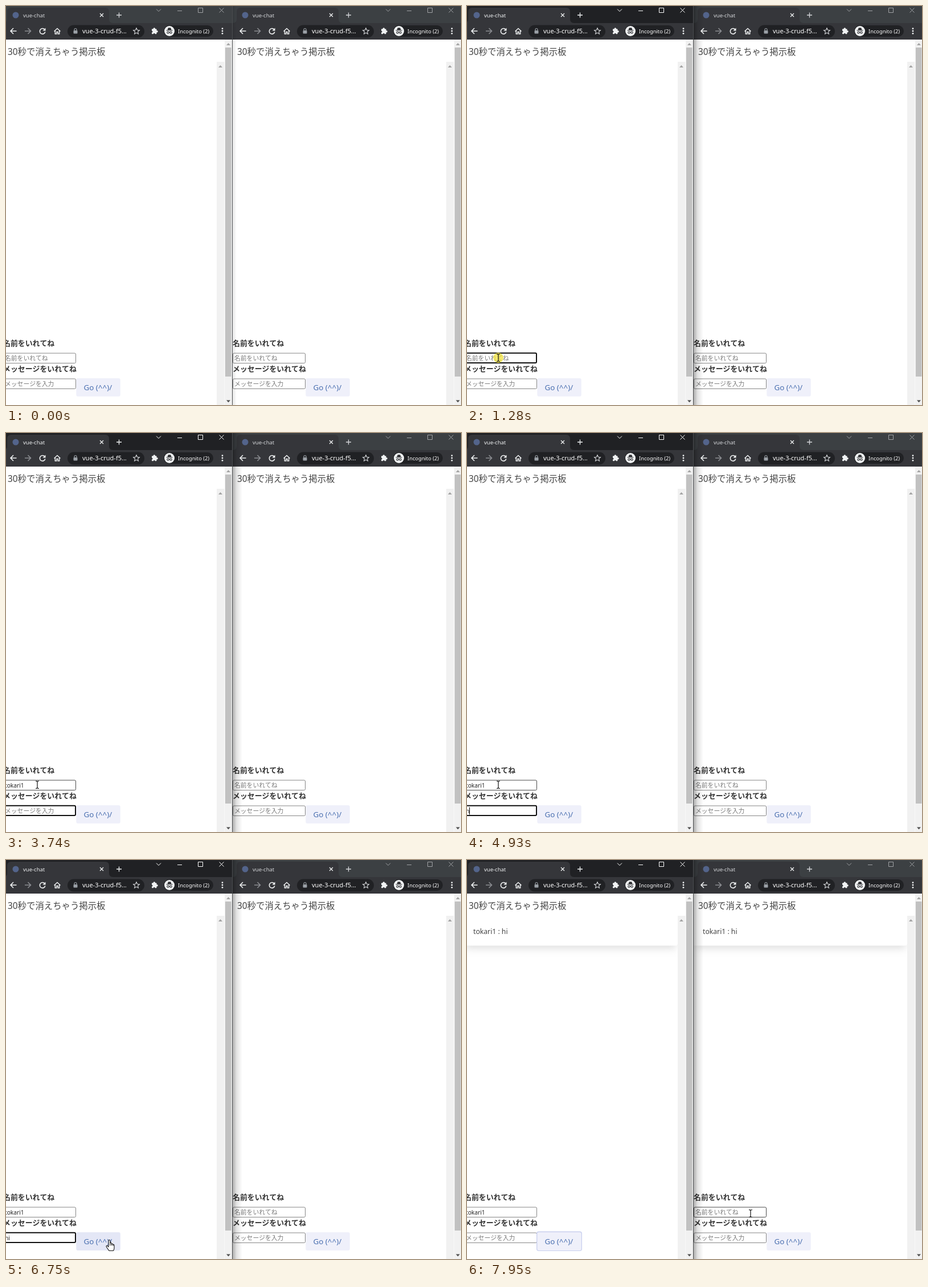
Recreate the animation shown at these times as an HTML page with a canvas. Size 799x701 px, loop 8000 ms.

```html
<!DOCTYPE html>
<html lang="ja">
<head>
<meta charset="utf-8">
<title>vue-chat</title>
<style>
  html, body { margin: 0; width: 799px; height: 701px; overflow: hidden; background: #fff; }
  canvas { display: block; }
</style>
</head>
<body>
<canvas id="stage" width="799" height="701"></canvas>
<script>
const c = document.getElementById('stage').getContext('2d');
const FONT = '"Noto Sans", "Noto Sans CJK JP", "Noto Sans CJK", sans-serif';
const LOOP = 8000, RIGHT = 403, BLINK = 530;
const NAME = 'tokari', MESSAGE = 'hi';

// Pointer stops: time, x, y. The pointer rests at each until the next.
const STOPS = [
  [200, 411, 675], [270, 302, 646], [470, 205, 610], [540, 108, 585], [610, 61, 578],
  [810, 55, 618], [6050, 92, 620], [6120, 210, 625], [6190, 288, 632], [6260, 284, 645],
  [6330, 254, 665], [6400, 219, 674], [6470, 206, 674], [6540, 196, 672], [6610, 188, 670],
  [6680, 183, 669], [6750, 181, 668], [7210, 345, 662], [7280, 510, 646],
  [7540, 507, 640], [7610, 503, 630], [7680, 500, 620], [7750, 498, 613],
  [7820, 498, 616], [7880, 498, 619], [7950, 498, 621]
];
const NAME_KEYS = [1560, 1690, 1820, 1950, 2080, 2210, 3340];
const MESSAGE_KEYS = [4930, 5060];
const ACTIVATE = 950, TAB = 3740, SEND = 6950, RECEIVE = 7080;

const BEAM = new Path2D('M-3-6.5Q0-6.5 0-5Q0-6.5 3-6.5M0-5V5M-3 6.5Q0 6.5 0 5Q0 6.5 3 6.5');
const ARROW = new Path2D('M.5.5V13L3.4 10.3L5.3 14.9L7.5 14L5.6 9.5H9.4Z');
const HAND = new Path2D('M-1 1.2Q-1-.5.4-.5Q1.9-.5 1.9 1.2V6.5Q2-.2 4.4 6.7Q6.9 5.6 7 7.8Q9 7 9 9V14Q9 16 7.5 18.5H0L-4.5 12Q-5.8 9.5-3.4 9.5L-1 11.5Z');

function box(x, y, w, h, r, fill, stroke, width = 1) {
  c.beginPath();
  c.roundRect(x, y, w, h, r);
  if (fill) { c.fillStyle = fill; c.fill(); }
  if (stroke) { c.strokeStyle = stroke; c.lineWidth = width; c.stroke(); }
}
const disc = (x, y, r, fill) => box(x - r, y - r, 2 * r, 2 * r, r, fill);
function line(d, color, width = 1) {
  c.strokeStyle = color;
  c.lineWidth = width;
  c.stroke(typeof d === 'string' ? new Path2D(d) : d);
}
function shape(d, color) {
  c.fillStyle = color;
  c.fill(typeof d === 'string' ? new Path2D(d) : d);
}
function text(s, x, y, size, color, weight = 400) {
  c.font = `${weight} ${size}px ${FONT}`;
  c.fillStyle = color;
  c.fillText(s, x, y);
}
const typed = (s, keys, t) => s.slice(0, keys.filter(k => k <= t).length);
const inside = (p, x, y, w, h) => p && p.x >= x && p.x < x + w && p.y >= y && p.y < y + h;

function pointerAt(t) {
  const stop = STOPS.filter(s => s[0] <= t).pop();
  return stop && { x: stop[1], y: stop[2] };
}

function browserBar(active) {
  const dark = '#202124', bar = '#35363a', white = '#f1f3f4', grey = '#8b8d91';
  const control = active ? '#fff' : '#a0a2a5';
  box(-6, 0, 404, 31, 0, active ? dark : '#3c4043');
  shape('M-5 30Q2 30 2 23V10Q2 3 9 3H174Q181 3 181 10V23Q181 30 188 30Z', bar);
  box(-6, 30, 404, 29, 0, bar);
  disc(17, 16, 5.5, '#53648b');
  text('vue-chat', 30, 19.5, 9.5, active ? '#f1f3f4' : '#d5d7da');
  line('M165 13L171 19M171 13L165 19', white, 1.3);
  line('M194 16H203M198.5 11.5V20.5', active ? white : '#d5d7da', 1.3);
  line('M264 5.5L268 9.5L272 5.5M301 8.5H309M374.5 3.5L382.5 11.5M382.5 3.5L374.5 11.5', control);
  box(337.5, 3.5, 8, 8, 0, null, control);

  line('M18.5 44H8M13 39L8 44L13 49', white, 1.6);
  line('M33 44H43.5M38.5 39L43.5 44L38.5 49', grey, 1.6);
  line('M68 41.5A4.8 4.8 0 1 0 68.8 45.5', white, 1.6);
  shape('M69.5 38.5V43.5H64.5Z', white);
  line('M84.5 44.5L90 39.5L95.5 44.5M86.3 43.5V49H88.8V45.5H91.2V49H93.7V43.5', white, 1.4);

  box(108, 33.5, 135, 22, 11, dark);
  box(118.5, 43, 7, 5.5, 1, '#9aa0a6');
  line('M120 43V41.5A2 2 0 0 1 124 41.5V43', '#9aa0a6', 1.2);
  text('vue-3-crud-f5...', 134, 48, 11, '#fff', 500);
  line('M229 38.7l1.6 3.6 3.8.4-2.9 2.6.9 3.8-3.4-2-3.4 2 .9-3.8-2.9-2.6 3.8-.4z', '#d5d7da', 1.1);

  box(256, 40.3, 8.5, 9, 1, white);
  disc(260.3, 40, 1.8, white);
  disc(265, 44.8, 1.8, white);
  disc(256, 45, 1.5, bar);
  disc(260.3, 49.3, 1.5, bar);

  box(277, 34, 87, 20, 10, dark);
  disc(287, 44, 9, white);
  shape('M283.6 42l1.1-3.8h4.6l1.1 3.8z', '#303134');
  line('M281.5 42.8H292.5M286.2 46.3H287.8', '#303134', 1.1);
  for (const x of [284.5, 289.5]) box(x - 1.7, 44.8, 3.4, 3.4, 1.7, null, '#303134', 1.1);
  text('Incognito (2)', 302, 47.5, 9.3, '#fff');
  for (const y of [39.7, 44, 48.3]) disc(380, y, 1.4, white);
}

function card(message) {
  c.save();
  c.beginPath();
  c.rect(-6, 99, 376, 90);
  c.clip();
  c.shadowColor = 'rgba(0,0,0,.13)';
  c.shadowBlur = 14;
  c.shadowOffsetY = 8;
  box(-2, 102, 369, 45, 4, '#fff');
  c.restore();
  box(-6, 99, 376, 51.5, [0, 0, 4, 0], '#fff');
  text(message, 11, 129.5, 12.2, '#444');
}

function field(y, value, hint, focused, hovered, caret) {
  if (focused) box(-4, y + .2, 126, 17.3, 2, '#fff', '#101010', 2);
  else box(-4.5, y + .5, 127, 17.5, 2, '#fff', hovered ? '#4a4a4a' : '#858585');
  if (value) text(value, -2, y + 13, 10.2, '#222');
  else text(hint, -2, y + 13.5, 10.8, '#7a7a7a');
  if (focused && caret) {
    c.font = `10.2px ${FONT}`;
    box(Math.round(-2 + c.measureText(value).width), y + 3, 1, 13, 0, '#000');
  }
}

function scrollbars() {
  box(370, 98, 13.5, 603, 0, '#f1f1f1');
  shape('M373 108L376.5 104L380 108Z', '#a3a3a3');
  box(384, 59, 14, 642, 0, '#f1f1f1');
  box(385, 73, 10.5, 578, 0, '#c1c1c1');
  shape('M387 69L390.5 65L394 69Z', '#a3a3a3');
  shape('M387 692.5L390.5 696.5L394 692.5Z', '#505050');
}

function chatWindow(offset, clipX, clipW, s) {
  c.save();
  c.beginPath();
  c.rect(clipX, 0, clipW, 701);
  c.clip();
  c.translate(offset, 0);
  const p = s.pointer && { x: s.pointer.x - offset, y: s.pointer.y };
  box(-6, 59, 404, 642, 0, '#fff');
  browserBar(s.active);
  text('30秒で消えちゃう掲示板', 3, 85.5, 15.4, '#444', 300);
  if (s.message) card(s.message);
  scrollbars();
  text('名前をいれてね', -5, 597.3, 12.9, '#333', 700);
  field(609.5, s.name, '名前をいれてね', s.focus === 'name', inside(p, -5, 609, 128, 19), s.caret);
  text('メッセージをいれてね', -5, 642.3, 12.9, '#333', 700);
  field(654.5, s.draft, 'メッセージを入力', s.focus === 'draft', inside(p, -5, 654, 128, 19), s.caret);
  const hover = inside(p, 123, 654, 78, 32);
  if (s.focus === 'go') box(122, 652.5, 80, 34.5, 4, '#c8cfee');
  box(123.3, 654, 77.5, 32, 3, hover ? '#e4e7f6' : '#eff0fa');
  text('Go (^^)/', 136.5, 675, 13.4, '#4a6fb0');
  c.restore();
}

function drawPointer({ x, y }) {
  const over = (...r) => inside({ x, y }, ...r) || inside({ x: x - RIGHT, y }, ...r);
  c.save();
  c.translate(x, y);
  if (over(-5, 609, 128, 19) || over(-5, 654, 128, 19)) {
    line(BEAM, '#111', 1.2);
  } else {
    const icon = over(123, 654, 78, 32) ? HAND : ARROW;
    shape(icon, '#fff');
    line(icon, '#111', 1.1);
    if (icon === HAND) line('M1.9 6.5V9.5M4.4 6.7V9.5M7 7.8V10', '#111', 1);
  }
  c.restore();
}

function edgeShadow(level) {
  const g = c.createLinearGradient(398, 0, 415, 0);
  const alpha = .1 + .22 * level;
  g.addColorStop(0, `rgba(0,0,0,${alpha})`);
  g.addColorStop(.4, `rgba(0,0,0,${alpha * .36 * level})`);
  g.addColorStop(1, 'rgba(0,0,0,0)');
  box(398, 0, 17, 701, 0, g);
  box(397, 0, 1, 701, 0, '#4b4d50');
}

function draw(t) {
  const pointer = pointerAt(t);
  const lastKey = [ACTIVATE, TAB, ...NAME_KEYS, ...MESSAGE_KEYS]
    .filter(k => k <= t).reduce((a, b) => Math.max(a, b), 0);
  const post = `${NAME}1 : ${MESSAGE}`;
  chatWindow(RIGHT, 398, 401, {
    pointer, name: '', draft: '', message: t >= RECEIVE && post
  });
  edgeShadow(Math.min(1, Math.max(0, (t - ACTIVATE) / 200)));
  chatWindow(0, 0, 397, {
    pointer,
    active: t >= ACTIVATE,
    name: typed(NAME + '1', NAME_KEYS, t),
    draft: t < SEND ? typed(MESSAGE, MESSAGE_KEYS, t) : '',
    focus: t < ACTIVATE ? '' : t < TAB ? 'name' : t < SEND ? 'draft' : 'go',
    caret: (t - lastKey) % (2 * BLINK) < BLINK,
    message: t >= SEND && post
  });
  if ((t >= 880 && t < 1360) || (t >= 6820 && t < RECEIVE)) {
    disc(pointer.x, pointer.y, 9, 'rgba(240,226,60,.75)');
  }
  if (pointer) drawPointer(pointer);
}

function tick() {
  draw(performance.now() % LOOP);
  requestAnimationFrame(tick);
}
tick();
</script>
</body>
</html>
```
